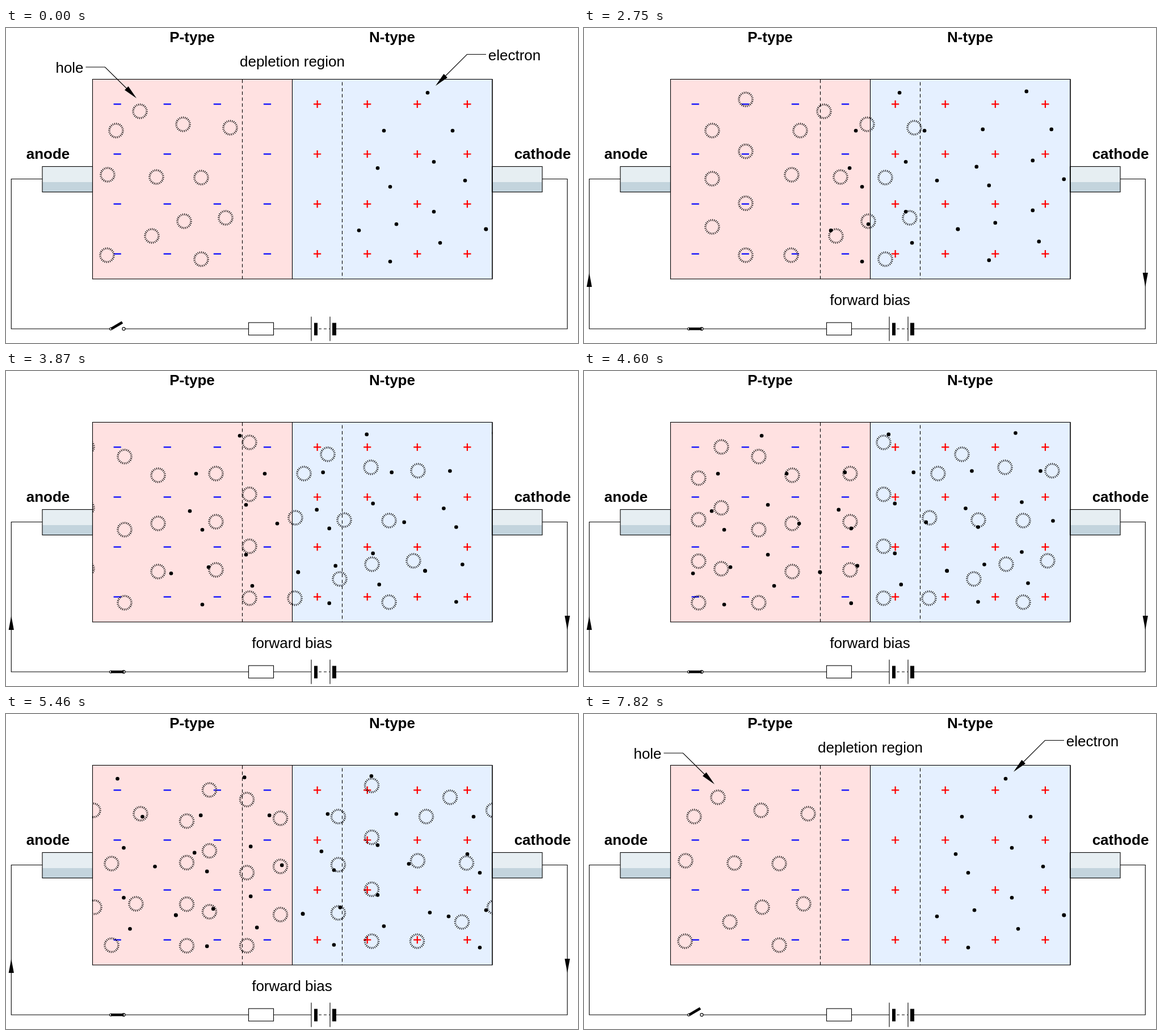
Recreate the animation shown at these times as an HTML page. Size 1008 by 556 pixels, loop 8 s.

```html
<!DOCTYPE html>
<html lang="en">
<head>
<meta charset="utf-8">
<title>Forward-biased diode</title>
<style>
html, body { margin: 0; width: 100%; height: 100%; overflow: hidden; background: #fff; }
svg { display: block; width: 100vw; height: 100vh; }
text { font: 26px "Liberation Sans", Arial, sans-serif; text-anchor: middle; }
.bold { font-weight: bold; }
.line { fill: none; stroke: #000; stroke-width: 1.1; }
.lever { stroke: #000; stroke-width: 4.6; }
.contact { fill: #fff; stroke: #000; stroke-width: 1.1; }
.minus { stroke: #00f; stroke-width: 2.2; }
.plus { stroke: #f00; stroke-width: 2.2; fill: none; }
</style>
</head>
<body>
<svg viewBox="0 0 1008 556" preserveAspectRatio="none">
  <defs>
    <clipPath id="body"><rect x="152.5" y="90.5" width="704.5" height="352.5"/></clipPath>
    <circle id="hole" r="12" fill="none" stroke="#000" stroke-width="3.5" pathLength="240" stroke-dasharray="3.6 6.4"/>
    <circle id="electron" r="3.3"/>
    <path id="minus" class="minus" d="M-6.6 0H6.6"/>
    <path id="plus" class="plus" d="M-6.6 0H6.6M0-6.6V6.6"/>
    <path id="head" d="M0 0L-25-4.6V4.6Z"/>
    <g id="terminal">
      <rect width="88.5" height="45" fill="#e6eef2"/>
      <rect y="27.5" width="88.5" height="17.5" fill="#c3d4dd"/>
      <rect class="line" width="88.5" height="45"/>
    </g>
  </defs>

  <rect x="152.5" y="90.5" width="352" height="352.5" fill="#ffe1e1"/>
  <rect x="504.5" y="90.5" width="352.5" height="352.5" fill="#e5f0ff"/>
  <use href="#terminal" x="64" y="244.5"/>
  <use href="#terminal" x="856.5" y="244.5"/>

  <g id="ions"></g>
  <g clip-path="url(#body)">
    <g id="holes"></g>
    <g id="electrons"></g>
  </g>
  <g id="pairs">
    <g id="pairHoles"></g>
    <g id="pairElectrons"></g>
  </g>

  <g class="line">
    <rect x="152.5" y="90.5" width="704.5" height="352.5"/>
    <path d="M504.5 90.5V443M857 90.5V443"/>
    <path d="M416.5 91V443M592.5 95.5V443" stroke-dasharray="6 4.5"/>
    <path d="M64 266.5H9.3V531H184M208 531H427.5M471.5 531H538M582 531H989.2V266.5H945"/>
    <rect x="427.5" y="520" width="44" height="22"/>
    <path d="M538 509.5V552.5M571 509.5V552.5"/>
    <path d="M551 531H571" stroke-dasharray="5 4"/>
  </g>
  <path d="M543 520.5h6v22h-6zM575 520.5h7v22h-7z"/>
  <circle class="contact" cx="184.5" cy="531" r="2"/>
  <circle class="contact" cx="207.5" cy="531" r="2.6"/>

  <text class="bold" x="328" y="25">P-type</text>
  <text class="bold" x="680.5" y="25">N-type</text>
  <text class="bold" x="74" y="231">anode</text>
  <text class="bold" x="945.5" y="231">cathode</text>

  <g id="open">
    <path class="lever" d="M185.5 531L205 519.5"/>
    <text x="112" y="78.5">hole</text>
    <text x="504.5" y="67.5">depletion region</text>
    <text x="896" y="56.5">electron</text>
    <path class="line" d="M140.5 69H174.5L220 114M846 46.5H812.5L767 92"/>
    <use href="#head" transform="translate(230 124) rotate(45)"/>
    <use href="#head" transform="translate(757 102) rotate(135)"/>
  </g>
  <g id="closed">
    <path class="lever" d="M185 531H207.5"/>
    <text x="504" y="489">forward bias</text>
    <use href="#head" transform="translate(9.3 432) rotate(-90)"/>
    <use href="#head" transform="translate(989.2 457) rotate(90)"/>
  </g>
</svg>
<script>
const LOOP = 8000, CLOSE = 1360, REOPEN = 6040, PAIR = 6260, MEET = 7410, VANISH = 7820;
const WIDTH = 704.5, JUNCTION = 504.5, PITCH = 88.1;
const $ = id => document.getElementById(id);
const run = (from, to, n) => Array.from({ length: n }, (_, i) => from + (to - from) * i / (n - 1));

const put = (group, symbol, x, y) => {
  const use = document.createElementNS("http://www.w3.org/2000/svg", "use");
  use.setAttribute("href", "#" + symbol);
  use.setAttribute("x", x);
  use.setAttribute("y", y);
  $(group).append(use);
};

// Holes at rest; the same set returns one body width later.
const restingHoles = [
  [236, 147], [194, 181], [312, 170], [395, 176], [179, 259], [265, 263],
  [344, 264], [314, 341], [387, 335], [257, 367], [178, 401], [344, 408]
];
for (const [x, y] of restingHoles) {
  put("holes", "hole", x, y);
  put("holes", "hole", x - WIDTH, y);
}
// Holes waiting outside, in evenly spaced columns: x, top, bottom, count.
const holeColumns = [
  [98, 126, 401, 4], [39, 181, 351, 3], [-63, 184, 354, 3],
  [-122, 151, 409, 3], [-188, 134, 349, 3], [-228, 189, 409, 4]
];
for (const [x, top, bottom, count] of holeColumns) {
  for (const y of run(top, bottom, count)) put("holes", "hole", x, y);
}

// Electrons follow in waves of the same pattern, each a little higher.
const restingElectrons = [
  [743, 114], [666, 181], [787, 181], [655, 247], [754, 236], [809, 269], [677, 280],
  [754, 324], [688, 346], [622, 357], [846, 355], [765, 379], [677, 412]
];
for (const [x, y] of restingElectrons) {
  for (let wave = 0; wave < 3; wave++) {
    put("electrons", "electron", x + 223.7 * wave, y + 0.3 - 2.4 * wave);
  }
  put("electrons", "electron", x + WIDTH, y + 0.3);
}

for (let row = 0; row < 4; row++) {
  for (let col = 0; col < 8; col++) {
    put("ions", col < 4 ? "minus" : "plus", 196.2 + PITCH * col, 134.4 + PITCH * row);
  }
}
for (let row = 0; row < 3; row++) {
  put("pairHoles", "hole", JUNCTION, 179 + PITCH * row);
  put("pairElectrons", "electron", JUNCTION, 179 + PITCH * row);
}

// Motion advances in ticks that quicken as the current settles.
const ticks = [
  0, CLOSE, 1640, ...run(1880, 2490, 6), ...run(2630, 3360, 7), ...run(3460, 4190, 8),
  ...run(4290, 5010, 8), ...run(5100, 5840, 9), 5950, REOPEN, ...run(PAIR, MEET, 17)
];
const ROUNDING = 10;
const drift = [[CLOSE, 0], [2752, 187], [3877, 331], [4599, 430], [5470, 546.5], [REOPEN, 625]];
const gap = [[PAIR, 29.5], [6548, 17.5], [7122, 6], [MEET, 0]];

const along = (points, t) => {
  const next = points.findIndex(([time]) => time >= t);
  if (next < 0) return points[points.length - 1][1];
  if (next === 0) return points[0][1];
  const [t0, v0] = points[next - 1], [t1, v1] = points[next];
  return v0 + (v1 - v0) * (t - t0) / (t1 - t0);
};
const shift = (id, x) => $(id).setAttribute("transform", `translate(${x.toFixed(2)} 0)`);
const show = (id, on) => $(id).setAttribute("visibility", on ? "visible" : "hidden");

function draw() {
  const time = performance.now() % LOOP;
  const tick = ticks.findLast(t => t <= time + ROUNDING);
  const closed = time >= CLOSE && time < REOPEN;
  const moved = closed ? along(drift, tick) : 0;
  const apart = along(gap, tick);
  show("open", !closed);
  show("closed", closed);
  show("pairs", time >= PAIR && time < VANISH);
  shift("holes", moved);
  shift("electrons", -moved);
  shift("pairHoles", -apart);
  shift("pairElectrons", apart);
  requestAnimationFrame(draw);
}
draw();
</script>
</body>
</html>
```
